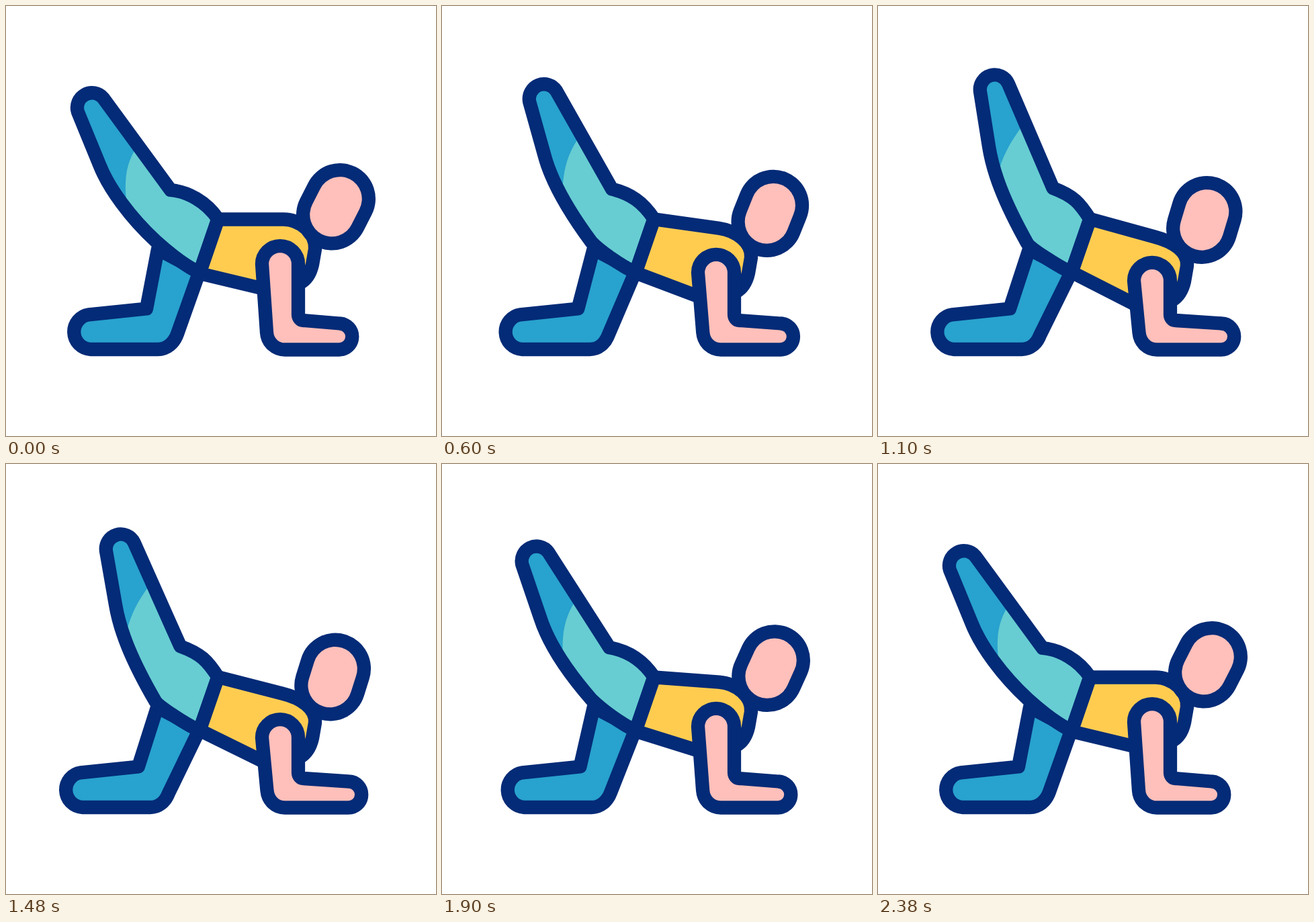
These frames come from a looping animation (640x640 px, 2400 ms). An HTML page:

```html
<!DOCTYPE html>
<html lang="en">
<head>
<meta charset="utf-8">
<title>Leg raise exercise</title>
<style>
  html, body { margin: 0; width: 100%; height: 100%; overflow: hidden; background: #fff; }
  svg { display: block; width: 100%; height: 100%; }
  .line { stroke: #042b77; stroke-width: 20.3; stroke-linejoin: round; stroke-linecap: round; }
  .head { fill: none; stroke-linecap: round; }
</style>
</head>
<body>
<svg viewBox="0 0 640 640">
  <clipPath id="legClip"><path data-part="leg"/></clipPath>
  <path class="line" data-part="stand" fill="#28a2ce"/>
  <path data-part="leg" fill="#28a2ce"/>
  <g clip-path="url(#legClip)"><path data-part="shine" fill="#67cdd2"/></g>
  <path class="line" data-part="torso" fill="#ffcc50"/>
  <path class="line" data-part="leg" fill="none"/>
  <path class="head" data-part="head" stroke="#042b77" stroke-width="106"/>
  <path class="head" data-part="head" stroke="#ffbfba" stroke-width="65.5"/>
  <path class="line" data-part="arm" fill="#ffbfba"/>
</svg>
<script>
const LOOP = 2400, HALF = 1190;

// Each part: lowered pose, raised pose (same path commands).
const parts = {
  stand: [
    'M226 362 L209 450.5 L123.5 459.3 A26 26 0 0 0 126 511 L226 511 C239 511 250 502 255 488 L288 395 Z',
    'M225 362 L196 450.5 L110.5 459.3 A26 26 0 0 0 113 511 L214 511 C226 511 236 503 241 490 L288 395 Z'
  ],
  leg: [
    'M107 158 A22 22 0 0 1 144.7 137 L245 274 C270 276 298 291 315.5 317 L288 397 C266 386 244 369 223 350 C185 315 152.7 271 139 236 Z',
    'M152.3 127.5 A22 22 0 0 1 194.2 115.4 L260.5 271 C292 283 300 293 315.5 317 L288 397 C262 384 226 360 222 353 C187 290 171 247 165 208 Z'
  ],
  shine: [
    'M197 207 C178 232 175 262 180 296 L180 420 L340 420 L340 207 Z',
    'M219 173 C198 200 187 220 179 247 L179 420 L340 420 L340 173 Z'
  ],
  torso: [
    'M315.5 317.5 L413 317.5 C438 317.5 462 339 460 362 L456 385 C453 398 448 407 438 412 L380 420 L288 398 Z',
    'M315.5 317 L411 343.5 C440 351 462 366 460 387 L456 410 C453 423 448 432 438 438 L380 443 L288 396 Z'
  ],
  head: [
    'M497 287 L485 310.5',
    'M489.5 306 L482 331'
  ],
  arm: [
    'M388 486 L381 384 A27 27 0 0 1 435 384 L435 459 C435 464 438 468 443 468 L496.5 472.5 A19.5 19.5 0 0 1 495 511.5 L415 511.5 C401 511.5 389 501 388 486 Z',
    'M388.5 486 L381 409 A27 27 0 0 1 435 409 L435 459 C435 464 438 468 443 468 L511.5 472.5 A19.5 19.5 0 0 1 510 511.5 L415 511.5 C401 511.5 390 501 388.5 486 Z'
  ]
};

const NUM = /-?\d+(\.\d+)?/g;

function mix([a, b], k) {
  const ends = b.match(NUM);
  let i = 0;
  return a.replace(NUM, n => +n + (ends[i++] - n) * k);
}

// cubic-bezier(.62, 0, .38, 1)
function ease(x) {
  let lo = 0, hi = 1, s = 0.5;
  for (let i = 0; i < 24; i++) {
    const r = 1 - s;
    if (1.86 * s * r * r + 1.14 * s * s * r + s * s * s < x) lo = s; else hi = s;
    s = (lo + hi) / 2;
  }
  return s * s * (3 - 2 * s);
}

const nodes = [...document.querySelectorAll('[data-part]')];

function draw(now) {
  const t = now % LOOP;
  const k = ease(Math.max(0, 1 - Math.abs(t - HALF) / HALF));
  for (const n of nodes) n.setAttribute('d', mix(parts[n.dataset.part], k));
}

let start = null;
function tick(now) {
  if (start === null) start = now;
  draw(now - start);
  requestAnimationFrame(tick);
}
draw(0);
requestAnimationFrame(tick);
</script>
</body>
</html>
```
